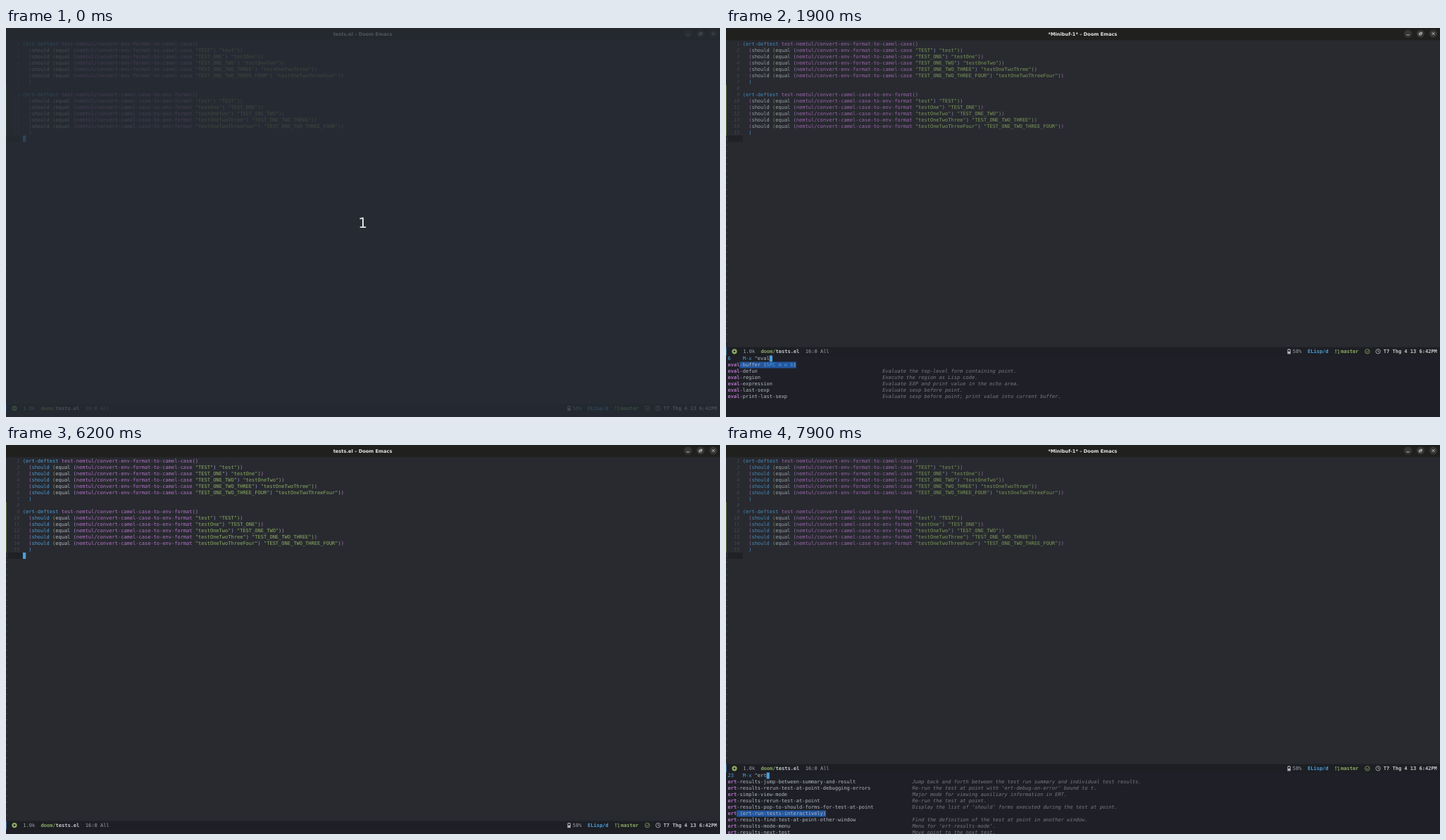
Recreate the animation shown at these times as an HTML page with a canvas. Size 1014x553 px, loop 8 s.

```html
<!DOCTYPE html>
<html lang="en">
<head>
<meta charset="utf-8">
<title>Editor session</title>
<style>
html, body { margin: 0; width: 100%; height: 100%; overflow: hidden; background: #282a30; }
canvas { display: block; width: 1014px; height: 553px; }
</style>
</head>
<body>
<canvas id="stage"></canvas>
<script>
const W = 1014, H = 553, LOOP = 8000;
const CHAR = 4.225, ROW = 8.98, LEFT = 2.6, CODE_X = 23.75, CODE_Y = 18.2;
const MONO = '7.02px "DejaVu Sans Mono", monospace';
const SANS = '"DejaVu Sans", sans-serif';
const C = {
  bg: '#282a30', bar: '#1d1f24', mini: '#1f2027', title: '#20201e',
  text: '#b4b8bf', dim: '#777a80', blue: '#4ba0dc', magenta: '#b274c4',
  green: '#8dac62', violet: '#9a94d0', select: '#2257a0', number: '#41454c'
};

const canvas = document.getElementById('stage');
const scale = window.devicePixelRatio || 1;
canvas.width = W * scale;
canvas.height = H * scale;
const ctx = canvas.getContext('2d');
ctx.scale(scale, scale);
ctx.textRendering = 'geometricPrecision';

function testBlock(name, fn, pairs) {
  return [`(ert-deftest test-${name}/${fn}()`,
    ...pairs.map(([a, b]) => `  (should (equal (${name}/${fn} "${a}") "${b}"))`), '  )'];
}
const words = [['test', 'TEST'], ['testOne', 'TEST_ONE'], ['testOneTwo', 'TEST_ONE_TWO'],
  ['testOneTwoThree', 'TEST_ONE_TWO_THREE'], ['testOneTwoThreeFour', 'TEST_ONE_TWO_THREE_FOUR']];
const code = [
  ...testBlock('nemtul', 'convert-env-format-to-camel-case', words.map(([a, b]) => [b, a])), '',
  ...testBlock('nemtul', 'convert-camel-case-to-env-format', words)
];

// Candidates: [command, description, description column, key binding]
const evalBuffer = ['eval-buffer', '', 52, 'SPC m e b'];
const start = [
  ['evil-collection-magit-toggle-text-minor-mode', 'Minor mode used to enabled toggle key in ‘text-mode’ after'],
  ['org-capture-goto-last-stored', 'Go to the location where the last capture note was stored.'],
  ['magit-section-show-headings', 'Recursively show headings of children of the current section.'],
  ['flycheck-list-errors', '', 52, 'C-c ! l'],
  ['evil-find-file-at-point-visual', 'Find the filename selected by the visual region.'],
  ['pr-ps-file-preview', 'Preview PostScript file FILENAME.'],
  ['calendar-forward-week', 'Move the cursor forward ARG weeks.'],
  ['lsp-treemacs-cycle-severity', 'Cycle through the severity levels shown in the errors list'],
  ['org-indent-drawer', 'Indent the drawer at point.']
];
const evalList = [
  evalBuffer,
  ['eval-defun', 'Evaluate the top-level form containing point.'],
  ['eval-region', 'Execute the region as Lisp code.'],
  ['eval-expression', 'Evaluate EXP and print value in the echo area.'],
  ['eval-last-sexp', 'Evaluate sexp before point.'],
  ['eval-print-last-sexp', 'Evaluate sexp before point; print value into current buffer.']
];
const erList = [
  ['erevision (ediff-revision)'],
  ['ert-run-tests-interactively', 'Run the tests specified by SELECTOR and display the results in a buffer.'],
  ['ert-results-toggle-printer-limits-for-test-at-point', 'Toggle how much of the condition to print for the test at point.', 62],
  ['er/mark-word', 'Mark the entire word around or in front of point.', 62],
  ['erc-server-select', 'Interactively select a server to connect to using ‘erc-server-alist’.', 62],
  ['erc-select (erc)'],
  ['er/contract-region', 'Contract the selected region to its previous size.', 62],
  ['er/mark-defun', 'Mark defun around or in front of point.', 62],
  ['er/mark-text-paragraph', 'Marks one paragraph.', 62]
];
const ertList = [
  ['ert-results-jump-between-summary-and-result', 'Jump back and forth between the test run summary and individual test results.', 62],
  ['ert-results-rerun-test-at-point-debugging-errors', 'Re-run the test at point with ‘ert-debug-on-error’ bound to t.', 62],
  ['ert-simple-view-mode', 'Major mode for viewing auxiliary information in ERT.', 62],
  ['ert-results-rerun-test-at-point', 'Re-run the test at point.', 62],
  ['ert-results-pop-to-should-forms-for-test-at-point', 'Display the list of ‘should’ forms executed during the test at point.', 62],
  ['ert (ert-run-tests-interactively)'],
  ['ert-results-find-test-at-point-other-window', 'Find the definition of the test at point in another window.', 62],
  ['ert-results-mode-menu', 'Menu for ‘ert-results-mode’.', 62],
  ['ert-results-next-test', 'Move point to the next test.', 62]
];
const evList = [...evalList, start[0], start[4]];
const lists = {
  '': [8529, start], e: [1046, [...evList, erList[1]]], ev: [672, evList],
  eva: [9, evalList], eval: [6, evalList], 'eval-': [6, evalList],
  er: [65, erList], ert: [23, ertList]
};

// [time, typed command]; null means the prompt is closed
const steps = [[0, null], [1100, ''], [1300, 'e'], [1450, 'ev'], [1600, 'eva'], [1800, 'eval'],
  [2200, 'eval-'], [2600, 'eval-b'], [3000, 'eval-bu'], [3300, 'eval-buf'], [3500, 'eval-buff'],
  [4800, null], [6800, ''], [7000, 'e'], [7200, 'er'], [7600, 'ert']];

function rect(x, y, w, h, color) {
  ctx.fillStyle = color;
  ctx.fillRect(x, y, w, h);
}

function circle(x, y, r, color, filled) {
  ctx.beginPath();
  ctx.arc(x, y, r, 0, 7);
  ctx.fillStyle = ctx.strokeStyle = color;
  filled ? ctx.fill() : ctx.stroke();
}

function lines(color, ...paths) {
  ctx.strokeStyle = color;
  ctx.beginPath();
  for (const [x, y, ...rest] of paths) {
    ctx.moveTo(x, y);
    for (let i = 0; i < rest.length; i += 2) ctx.lineTo(rest[i], rest[i + 1]);
  }
  ctx.stroke();
}

// Draws monospaced text and returns the x where it ends.
function write(text, x, y, color, style = '') {
  ctx.font = `${style} ${MONO}`;
  ctx.fillStyle = color;
  ctx.fillText(text, x, y);
  return x + text.length * CHAR;
}

function drawTitle(text) {
  rect(0, 0, W, 17.5, C.title);
  ctx.font = `bold 6.65px ${SANS}`;
  ctx.fillStyle = '#e6e6e4';
  ctx.textAlign = 'center';
  ctx.fillText(text, 506.5, 10.8);
  ctx.textAlign = 'left';
  for (const x of [968.5, 986.3, 1004.5]) circle(x, 8, 5.6, '#363634', true);
  ctx.lineWidth = 0.8;
  lines('#dededc', [966.5, 9.8, 970.5, 9.8], [1002.5, 6, 1006.5, 10], [1006.5, 6, 1002.5, 10],
    [985.8, 6.2, 988.3, 6.2, 988.3, 8.8]);
  ctx.strokeRect(984.3, 7.3, 2.8, 2.6);
}

function drawCode(shouldColor, active, bottom) {
  rect(0, 17.5, W, bottom - 17.5, C.bg);
  rect(0, CODE_Y + 7 * ROW, 1, 8 * ROW, '#59663a');
  rect(LEFT, CODE_Y + 15 * ROW, CODE_X - LEFT, ROW, '#1f2126');
  for (let y = CODE_Y + 15 * ROW; y + ROW < bottom; y += ROW) write('~', -0.8, y + 6.8, '#484c54');

  const delimiters = [C.blue, C.magenta, C.green, C.violet];
  let depth = 0;
  code.forEach((line, i) => {
    const y = CODE_Y + i * ROW + 6.8, label = String(i + 1);
    write(label, CODE_X - (label.length + 1) * CHAR, y, C.number, 'italic');
    ctx.globalAlpha = active ? 1 : 0.83;
    let x = CODE_X;
    for (const token of line.match(/"[^"]*"|[()]|[^\s()"]+|\s+/g) || []) {
      let color = C.text;
      if (token === '(') color = delimiters[depth++];
      else if (token === ')') color = delimiters[--depth];
      else if (token[0] === '"') color = C.green;
      else if (token === 'ert-deftest') color = C.blue;
      else if (token === 'should') color = shouldColor;
      else if (token.includes('/')) color = C.magenta;
      x = write(token, x, y, color);
    }
    ctx.globalAlpha = 1;
  });
  if (active) rect(CODE_X + 0.2, CODE_Y + 15 * ROW, CHAR, ROW, C.blue);
}

function drawModeline(y) {
  const base = y + 2.6;
  rect(0, y - 6, W, 12, C.bar);
  rect(0, y - 6, 1, 12, '#3a6d98');
  circle(12, y, 3.6, C.green, true);
  circle(12, y, 1.3, C.bar, true);
  write('1.0k', 24.3, base, '#9da1a8');
  write('tests.el', write('doom/', 49.4, base, C.green, 'bold'), base, '#c4c7cc', 'bold');
  write('16:0 All', 112.8, base, '#9da1a8');

  ctx.lineWidth = 0.8;
  ctx.strokeStyle = C.text;
  ctx.strokeRect(797.8, y - 2.6, 3.6, 5.8);
  rect(798.6, y - 3.6, 2, 1, C.text);
  rect(798, y, 3.2, 3, C.text);
  write('58%', 804.8, base, '#9da1a8');
  write('ELisp/d', 826, base, C.blue, 'bold');
  lines(C.green, [866, y - 2, 866, y + 2.8], [868, y - 2, 870, y - 2, 870, y + 2.8]);
  circle(866, y - 2, 0.8, C.green, true);
  circle(870, y + 2.5, 0.8, C.green, true);
  write('master', 873, base, C.green, 'bold');
  circle(910.8, y, 3.2, C.green);
  lines(C.green, [909.2, y, 910.5, y + 1.3, 912.6, y - 1.2]);
  circle(926, y, 3.2, '#b8bbc0');
  lines('#b8bbc0', [926, y - 2, 926, y, 927.6, y + 0.6]);
  write('T7 Thg 4 13 6:42PM', 933.8, base, '#c4c7cc', 'bold');
}

function drawPrompt(typed, running, late) {
  const top = 465.6;
  let [count, rows] = lists[typed] || [1, [evalBuffer]];
  if (typed === '' && late) rows = [evalBuffer, ...rows];
  const selected = typed === 'ert' ? 5 : 0;
  rect(0, top, W, H - top, C.mini);

  const x = write(String(count).padEnd(5) + 'M-x ', LEFT, top + 6.8, C.blue);
  const end = write('^' + typed, x, top + 6.8, C.text);
  rect(running ? LEFT : end, top, CHAR, ROW, C.blue);
  if (running) write(String(count), LEFT, top + 6.8, C.mini);

  rows.slice(0, 9).forEach(([name, info = '', column = 52, key], i) => {
    const rowTop = top + (i + 1) * ROW, y = rowTop + 6.8;
    const label = name + (key ? ` (${key})` : '');
    if (i === selected) {
      const width = info ? column + 80 : label.length;
      rect(LEFT + typed.length * CHAR, rowTop, (width - typed.length) * CHAR, ROW, C.select);
    }
    let pen = write(typed, LEFT, y, C.magenta, 'bold');
    pen = write(name.slice(typed.length), pen, y, C.text);
    if (key) {
      pen = write(' (', pen, y, C.text);
      pen = write(key, pen, y, C.blue);
      write(')', pen, y, C.text);
    }
    write(info, LEFT + column * CHAR, y, C.dim, 'italic');
  });
}

function drawCountdown() {
  ctx.globalAlpha = 0.78;
  rect(0, 0, W, H, '#262c34');
  ctx.globalAlpha = 1;
  ctx.font = `20px ${SANS}`;
  ctx.fillStyle = '#e8eaec';
  ctx.textAlign = 'center';
  ctx.fillText('1', 506.7, 284);
  ctx.textAlign = 'left';
}

function draw(t) {
  const typed = steps.filter(([time]) => time <= t).pop()[1];
  const open = typed !== null, barY = open ? 459.8 : 540.6;
  rect(0, 0, W, H, C.mini);
  drawTitle((open ? '*Minibuf-1*' : 'tests.el') + ' – Doom Emacs');
  drawCode(t < 4800 ? C.text : C.blue, !open, barY - 6);
  drawModeline(barY);
  if (open) drawPrompt(typed, t >= 4700 && t < 4800, t > 4800);
  if (t < 100) drawCountdown();
}

function tick() {
  draw(performance.now() % LOOP);
  requestAnimationFrame(tick);
}
tick();
</script>
</body>
</html>
```
